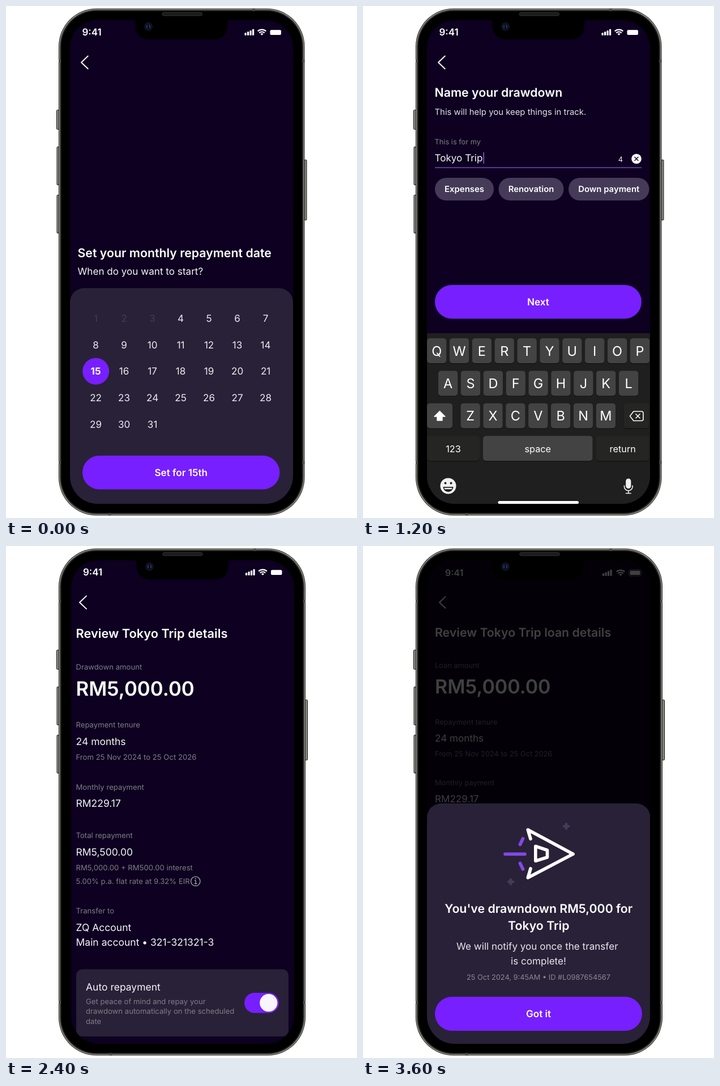
Recreate the animation shown at these times as an HTML page. Size 620x903 px, loop 4.8 s.

```html
<!DOCTYPE html>
<html lang="en">
<head>
<meta charset="utf-8">
<title>Drawdown flow</title>
<style>
html, body { margin: 0; width: 100%; height: 100%; overflow: hidden; background: #fff; }
svg { display: block; width: 620px; height: 903px; font-family: Inter, sans-serif; font-optical-sizing: none; text-rendering: geometricPrecision; }
</style>
</head>
<body>
<svg id="stage" viewBox="0 0 620 903"></svg>
<script>
const BG = '#0d0020', PANEL = '#292137', PURPLE = '#771fff', WHITE = '#fff', GRAY = '#807d86';
const TITLE = 21.3, BODY = 17.1, SMALL = 14.9, NOTE = 12.8;

const text = (x, y, size, str, { w = 400, fill = '#f7f5fa', anchor = 'start' } = {}) =>
  `<text x="${x}" y="${y}" font-size="${size}" font-weight="${w}" fill="${fill}" text-anchor="${anchor}">${str}</text>`;
const mid = (x, y, size, str, o = {}) => text(x, y, size, str, { ...o, anchor: 'middle' });
const bold = (x, y, size, str) => text(x, y, size, str, { w: 600, fill: WHITE });
const gray = (x, y, size, str) => text(x, y, size, str, { fill: GRAY });
const box = (x, y, w, h, r, fill, more = '') =>
  `<rect x="${x}" y="${y}" width="${w}" height="${h}" rx="${r}" fill="${fill}" ${more}/>`;
const dot = (x, y, r, fill) => `<circle cx="${x}" cy="${y}" r="${r}" fill="${fill}"/>`;
const line = (d, stroke, w) =>
  `<path d="${d}" fill="none" stroke="${stroke}" stroke-width="${w}" stroke-linecap="round" stroke-linejoin="round"/>`;
const fillPath = (d, fill) => `<path d="${d}" fill="${fill}"/>`;
const move = (x, y, s) => `<g transform="translate(${x} ${y})">${s}</g>`;
const button = (x, y, w, h, label) =>
  box(x, y, w, h, h / 2, PURPLE) + mid(x + w / 2, y + h / 2 + 6.2, BODY, label, { w: 600, fill: WHITE });
const back = (x, y, w, h) => line(`M${x + w} ${y - h}L${x} ${y}L${x + w} ${y + h}`, WHITE, 1.9);

const bars = () => [4.5, 6.5, 8.5, 11].map((h, i) => box(i * 4.5, 11 - h, 3.2, h, .9, WHITE)).join('');
const wifi = () =>
  `<g fill="none" stroke="#fff" stroke-width="2.1"><path d="M.7 4.1a10.4 10.4 0 0 1 14.6 0M3.3 6.9a6.7 6.7 0 0 1 9.4 0"/></g>` +
  fillPath('M8 11.2L5.5 8.8a3.6 3.6 0 0 1 5 0z', WHITE);
const status = x =>
  bold(x, 52, 17, '9:41') + move(x + 287, 40.8, bars()) +
  move(x + 309.5, 40.5, wifi()) + box(x + 332, 42.2, 19.5, 8.8, 2, WHITE);

function calendar() {
  let s = status(134.5) + back(133, 99.5, 11.8, 11.2) +
    bold(126.5, 443, TITLE, 'Set your monthly repayment date') +
    text(126.5, 474, BODY, 'When do you want to start?') +
    box(113, 497.5, 394, 420, 25, PANEL) + dot(158.7, 644.2, 23.5, PURPLE);
  for (let d = 1; d <= 31; d++) {
    const x = 158.6 + (d - 1) % 7 * 50, y = 556.7 + Math.floor((d - 1) / 7) * 46.8;
    s += mid(x, y, BODY, d, { w: d === 15 ? 700 : 400, fill: d < 4 ? '#433c50' : d === 15 ? WHITE : '#eeebf2' });
  }
  return s + button(135, 793, 348.5, 59.5, 'Set for 15th');
}

function key(x, y, w, label, fill = '#434343', size = 23.5) {
  return box(x, y + 1.2, w, 44, 5, '#101010') + box(x, y, w, 44, 5, fill) +
    mid(x + w / 2, y + (size > 20 ? 30.6 : 28.4), size, label, { fill: WHITE });
}

function keyboard() {
  const rows = [['QWERTYUIOP', 113], ['ASDFGHJKL', 133], ['ZXCVBNM', 172.5]];
  const dark = '#252524', pale = '#f0f0f0', shift = 'M135.5 714.5L126 724h5v7h9v-7h5z';
  let s = box(113, 577, 394, 310, 0, '#1f1f1f');
  rows.forEach(([letters, x], r) => [...letters].forEach((c, i) => {
    s += key(x + i * 39.87, 586 + r * 57.4, 34.3, c);
  }));
  s += key(113, 700.8, 45, '') + key(460.5, 700.8, 45, '', dark) +
    key(113, 758.2, 93, '123', dark, 16.3) + key(212, 758.2, 193.5, 'space', '#434343', 16.3) +
    key(412, 758.2, 93.5, 'return', dark, 16.3);
  s += line(shift, WHITE, 1.4) + fillPath(shift, WHITE);
  s += line('M478 715h14a3 3 0 0 1 3 3v10.5a3 3 0 0 1-3 3h-14l-6.5-8.2zM482 719.7l7 7m0-7l-7 7', WHITE, 1.6);
  // smiley and microphone
  s += dot(150.5, 846.5, 14, pale) + dot(145.5, 841.5, 2, '#1f1f1f') + dot(155.5, 841.5, 2, '#1f1f1f') +
    fillPath('M141.5 848h18a9 9 0 0 1-18 0z', '#1f1f1f') + fillPath('M143.5 849.7h14l-.8 2.5h-12.4z', pale);
  s += box(464.2, 833.5, 9.2, 17.5, 4.6, pale) +
    line('M461.5 846v1.5a7.3 7.3 0 0 0 14.6 0v-1.5M468.8 855v4.5M464.5 859.5h8.6', pale, 1.6);
  return s + box(238.5, 873, 142.5, 5, 2.5, WHITE);
}

function naming() {
  const chip = (x, w, label) => box(x, 303, w, 40, 20, '#453a58') +
    mid(x + w / 2, 328.2, SMALL, label, { w: 600, fill: WHITE });
  return status(134.5) + back(133, 99.5, 11.8, 11.2) +
    bold(126.5, 160, TITLE, 'Name your drawdown') +
    text(126.5, 192.2, SMALL, 'This will help you keep things in track.', { fill: '#e4e1ea' }) +
    gray(126.5, 244.3, NOTE, 'This is for my') + text(126.5, 274, BODY, 'Tokyo Trip') +
    box(212.5, 258, 1.4, 20, 0, '#9a5cff') + box(127, 284.3, 365, 1.5, 0, '#7448bd') +
    mid(455, 274.6, NOTE, '4') + dot(483, 269.5, 8.8, WHITE) +
    line('M480 266.5l6 6m0-6l-6 6', BG, 1.5) +
    chip(127, 104, 'Expenses') + chip(239.5, 115, 'Renovation') + chip(363, 142.5, 'Down payment') +
    button(127, 492, 365, 59.5, 'Next') + keyboard();
}

function review() {
  const x = 123.5, note = 13.15, body = 17.5;
  const label = (y, s) => gray(x, y, note, s), value = (y, s) => text(x, y, body, s);
  return status(136) + back(130, 99.5, 12, 11.4) +
    bold(x, 161.7, 21.8, 'Review Tokyo Trip details') +
    label(217.5, 'Drawdown amount') + bold(x, 263.5, 34.8, 'RM5,000.00') +
    label(320.3, 'Repayment tenure') + value(351, '24 months') + label(377, 'From 25 Nov 2024 to 25 Oct 2026') +
    label(429.8, 'Monthly repayment') + value(460, 'RM229.17') +
    label(515, 'Total repayment') + value(545.5, 'RM5,500.00') +
    label(571.8, 'RM5,000.00 + RM500.00 interest') + label(595.8, '5.00% p.a. flat rate at 9.32% EIR') +
    line('M343 591.3a8.2 8.2 0 1 1-16.4 0a8.2 8.2 0 0 1 16.4 0M333.5 590h1.6v5.5m-1.8 0h3.6', '#aaa5b2', 1.3) +
    dot(334.8, 586.8, 1.1, '#aaa5b2') +
    label(648.3, 'Transfer to') + value(679, 'ZQ Account') + value(705, 'Main account • 321-321321-3') +
    box(124, 746.5, 375, 118.5, 11, PANEL) + text(141, 784, body, 'Auto repayment') +
    ['Get peace of mind and repay your', 'drawdown automatically on the scheduled', 'date']
      .map((s, i) => gray(141, 808 + i * 17.4, note, s)).join('') +
    box(421, 788, 61, 35.5, 17.75, PURPLE) + dot(463.8, 805.7, 15.6, '#f8f5fc');
}

function done() {
  const x = 127, label = (y, s) => gray(x, y, NOTE, s), value = (y, s) => text(x, y, BODY, s);
  const plus = (x, y) => line(`M${x - 4} ${y}h8m-4-4v8`, '#453b57', 4.5);
  return text(145, 53, 16, '9:41', { w: 600 }) + move(423, 41.8, bars()) + move(447, 41.5, wifi()) +
    box(469.5, 41.8, 22, 11, 3, 'none', 'stroke="#8a8a8a"') + box(471.5, 43.5, 18, 7.6, 1.5, WHITE) +
    back(135, 99.5, 10.5, 10) + bold(x, 160.2, TITLE, 'Review Tokyo Trip loan details') +
    label(214.7, 'Loan amount') + bold(x, 259.7, 34, 'RM5,000.00') +
    label(315, 'Repayment tenure') + value(345, '24 months') + label(370.5, 'From 25 Nov 2024 to 25 Oct 2026') +
    label(422, 'Monthly payment') + value(451.5, 'RM229.17') +
    box(113, 20, 396, 865, 0, '#000', 'opacity=".75"') +
    box(113, 454, 394.5, 460, 25, PANEL) + plus(359, 494.3) + plus(261, 592.3) +
    line('M251 543.3h35M282.5 516l-5 10.5M277.5 559.5l5 10.5', '#8348e8', 5.8) +
    line('M296 516.5L291.3 500.5L371 543.3L291.3 585L296 569', WHITE, 5.8) +
    line('M304.8 529.5L325.5 536.5V549L304.8 555.5z', WHITE, 5.6) +
    mid(310.3, 647, TITLE, "You've drawndown RM5,000 for", { w: 600, fill: WHITE }) +
    mid(310.3, 676.7, TITLE, 'Tokyo Trip', { w: 600, fill: WHITE }) +
    mid(307.8, 712, BODY, 'We will notify you once the transfer', { fill: '#e9e6ee' }) +
    mid(310, 737.5, BODY, 'is complete!', { fill: '#e9e6ee' }) +
    mid(310, 765.3, NOTE, '25 Oct 2024, 9:45AM • ID #L0987654567', { fill: '#8d8896' }) +
    button(127, 795, 366, 60, 'Got it');
}

// dx: shift of the display, dw: extra width of the body
function phone(id, content, dx, dw) {
  const side = (x, y, h) => box(x, y, 4, h, 1, '#8a8981', 'stroke="#111"');
  const layer = (inset, fill) =>
    box(93 + inset, 4.5 + inset, 434.5 + dw - 2 * inset, 894 - 2 * inset, 67 - inset, fill);
  const right = 527.5 + dw, mark = '#50504a';
  return side(89.5, 183.5, 34) + side(90, 248.5, 67) + side(90, 333.5, 67) + side(right - .5, 271.5, 106) +
    layer(0, '#0a0a08') + layer(1, '#bdbcb1') + layer(2, '#3a3a35') + layer(3.8, '#141412') + layer(5, '#000') +
    [97, 805].map(y => box(93, y - 2.5, 4, 5, 0, mark) + box(right - 4, y - 2.5, 4, 5, 0, mark)).join('') +
    box(435 + dx, 4.5, 5, 4, 0, mark) + box(180.5 + dx, 894.5, 5, 4, 0, mark) +
    box(276 + dw / 2, 11.5, 70.5, 5.5, 2.5, '#1b1b1b', 'stroke="#343434"') +
    `<clipPath id="${id}">${box(113 + dx, 25, 394, 853, 49, '#000')}</clipPath>` +
    `<g clip-path="url(#${id})">${box(113, 20, 400, 865, 0, BG)}${content}</g>` +
    move(dx, 0, fillPath('M222 24q6.5 0 6.5 7v6a22 22 0 0 0 22 22h118.5a22 22 0 0 0 22-22v-6q0-7 6.5-7z', '#000') +
      dot(251.5, 36.3, 7.5, '#11131c') + dot(251.5, 36.3, 4.8, '#090b1d') +
      line('M249.3 34q-1.5 2.5 0 4.5M253 33.5q2.5 2.5 .5 5', '#2c3f91', 1.5));
}

const stage = document.getElementById('stage');
stage.innerHTML = [[calendar, 0, 0], [naming, 0, 0], [review, 2, 1.5], [done, 0, 1.5]]
  .map(([draw, dx, dw], i) => `<g>${phone('screen' + i, draw(), dx, dw)}</g>`).join('');
const screens = [...stage.children];

const start = performance.now();
function tick() {
  const now = Math.floor((performance.now() - start) % 4800 / 1200);
  screens.forEach((s, i) => s.style.display = i === now ? '' : 'none');
  requestAnimationFrame(tick);
}
tick();
</script>
</body>
</html>
```
